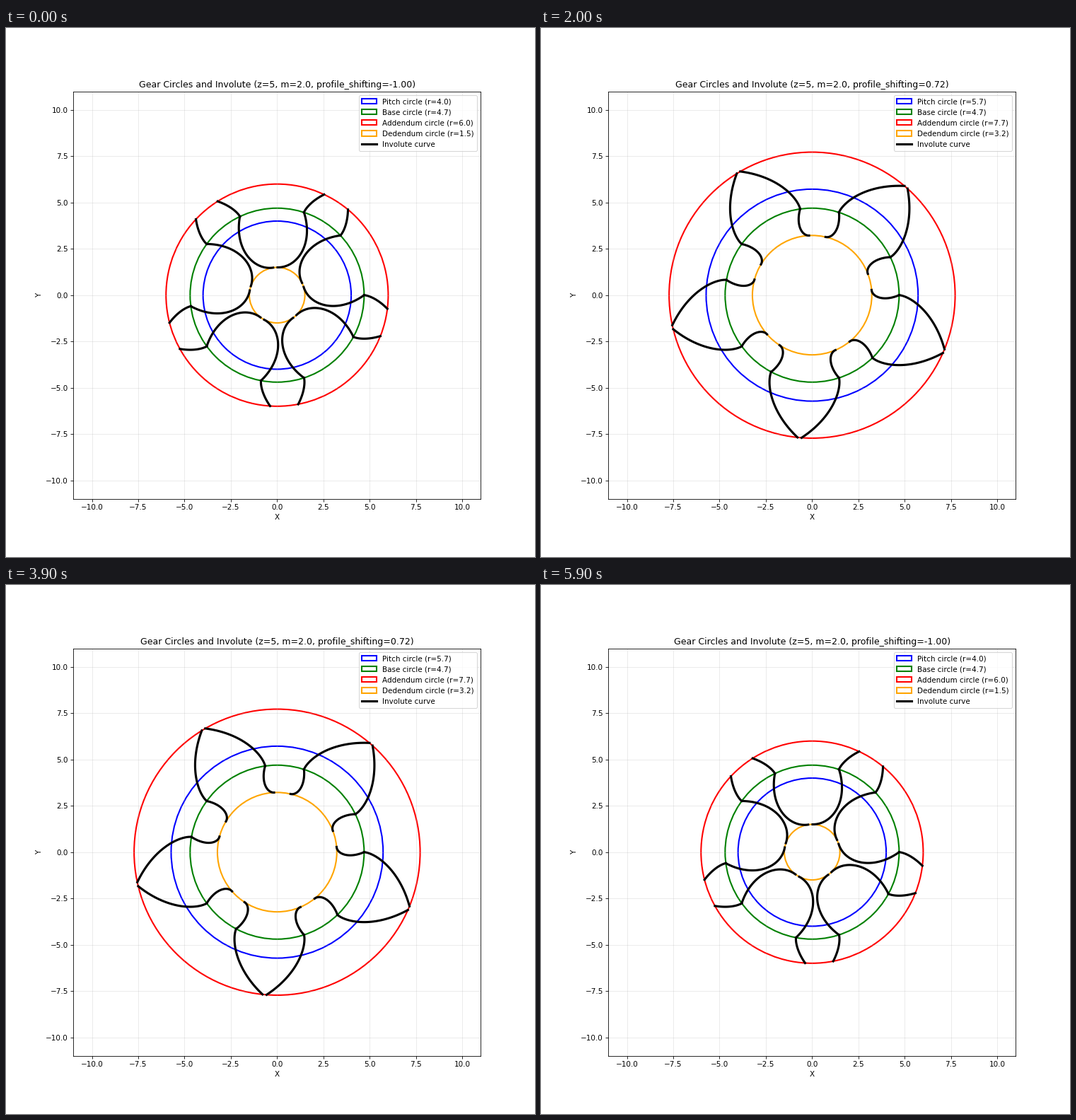
A matplotlib script that plays this animation: 748 by 748 pixels, repeating every 6 s.

```python
import numpy as np
import matplotlib.pyplot as plt
from matplotlib.animation import FuncAnimation
from matplotlib.patches import Circle

Z, M = 5, 2.0
STEPS = 30
R0 = M * Z / 2
RB = R0 * np.cos(np.radians(20))
SHIFTS = np.linspace(-1.0, 1.5, STEPS)

fig, ax = plt.subplots(figsize=(10, 10), dpi=74.8)
ax.set_aspect("equal")
ax.set_xlim(-11, 11)
ax.set_ylim(-11, 11)
ax.set_xlabel("X")
ax.set_ylabel("Y")
ax.grid(True, alpha=0.3)
title = ax.set_title("")

NAMES = ["Pitch", "Base", "Addendum", "Dedendum"]
COLORS = ["blue", "green", "red", "orange"]
circles = [
    ax.add_patch(Circle((0, 0), 1, fill=False, color=c, lw=2, label=f"{n} circle (r=0.0)"))
    for n, c in zip(NAMES, COLORS)
]
# four curves per tooth: involute and root, on both flanks
lines = [ax.plot([], [], color="black", lw=3)[0] for _ in range(4 * Z)]
lines[0].set_label("Involute curve")
legend = ax.legend(loc="upper right")


def inv(a):
    return np.tan(a) - a


def base_width(rp):
    """Angle of one tooth on the base circle, half a pitch wide at radius rp."""
    if rp >= RB:
        return np.pi / Z + 2 * inv(np.arccos(RB / rp))
    return np.pi / Z - 2 * inv(np.arccos(rp / RB))


def involute(ra):
    t = np.linspace(0, np.sqrt((ra / RB) ** 2 - 1), 100)
    return RB * np.sqrt(1 + t**2), np.arctan(t) - t


def root(rd):
    """Trochoid from the dedendum circle to angle 0 on the base circle."""
    q_end = np.sqrt(RB**2 - rd**2)
    q = np.linspace(0, q_end, 100)
    angle = q / RB - np.arctan2(q, rd)
    return np.hypot(rd, q), angle - angle[-1]


def update(frame):
    shift = SHIFTS[min(frame, 2 * STEPS - 1 - frame)]
    rp = R0 + shift * M / 2
    ra, rd = rp + M, rp - 1.25 * M
    for circle, text, name, r in zip(circles, legend.get_texts(), NAMES, (rp, RB, ra, rd)):
        circle.set_radius(r)
        text.set_text(f"{name} circle (r={r:.1f})")
    title.set_text(
        f"Gear Circles and Involute (z={Z}, m={M}, profile_shifting={shift:.2f})"
    )

    width = base_width(rp)
    free = iter(lines)
    for k in range(Z):
        turn = 2 * np.pi * k / Z
        for r, a in (involute(ra), root(rd)):
            for angle in (turn + a, turn - width - a):
                next(free).set_data(r * np.cos(angle), r * np.sin(angle))
    return [*circles, *lines, title, legend]


anim = FuncAnimation(fig, update, frames=2 * STEPS, interval=100, repeat=True, repeat_delay=0)
plt.show()
```
